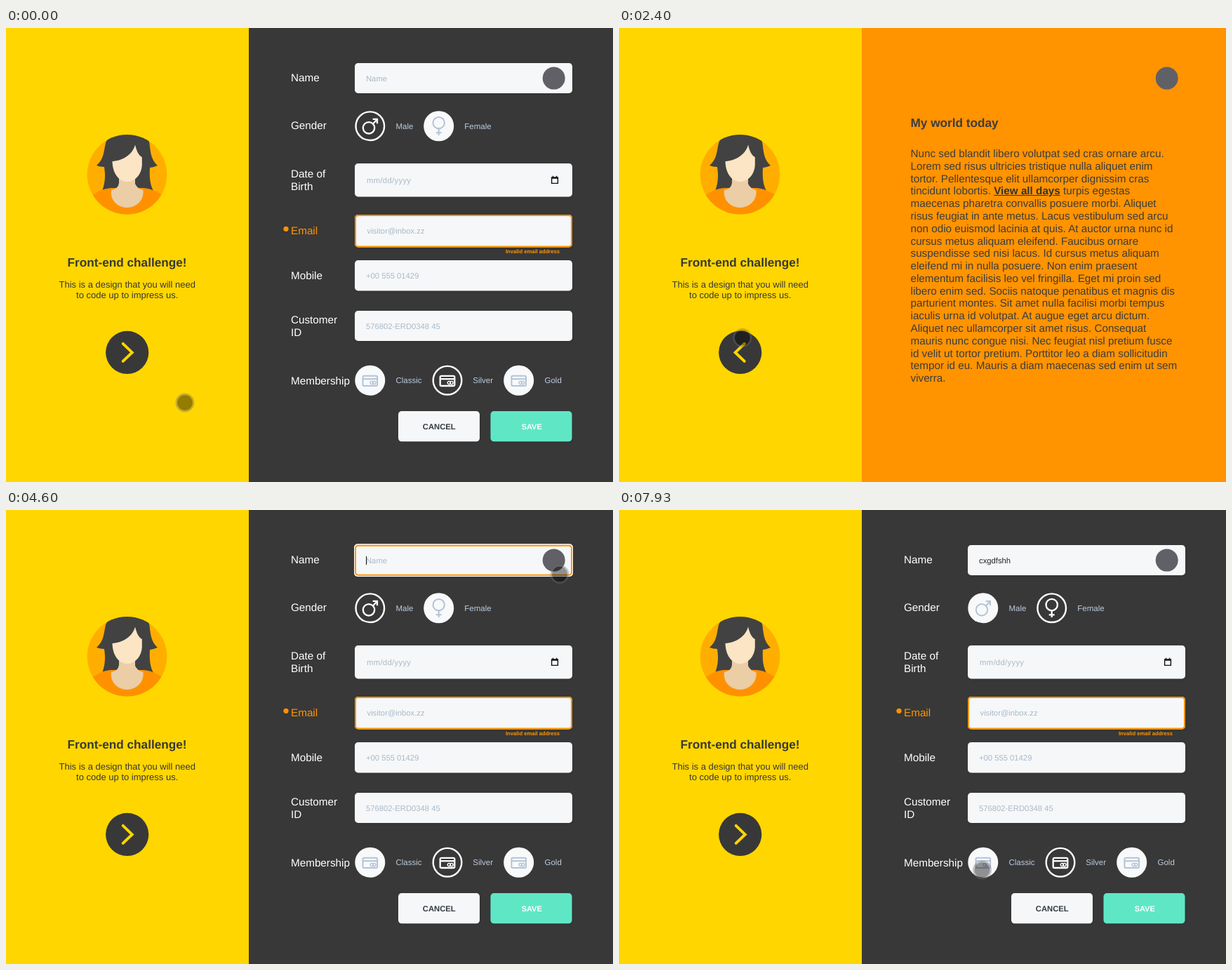
Recreate the animation shown at these times as an HTML page. Size 865 by 647 pixels, loop 8 s.

```html
<!DOCTYPE html>
<html lang="en">
<head>
<meta charset="utf-8">
<title>Front-end challenge</title>
<style>
  html, body { margin: 0; width: 100%; height: 100%; overflow: hidden; background: #383838; }
  body, text { font-family: "Liberation Sans", Arial, sans-serif; text-rendering: geometricPrecision; }
  svg, #panel { position: absolute; left: 0; top: 0; }
  svg { width: 865px; height: 647px; }
  #panel { left: 346px; height: 647px; overflow: hidden; background: #ff9300; }
  #copy { position: absolute; top: 0; height: 680px; display: flex; flex-direction: column; justify-content: center;
    color: #3d3d3d; font-size: 15.25px; line-height: 17.78px; }
  #copy div { position: relative; }
  #copy p { margin: 0; }
  #copy h2 { position: absolute; bottom: 100%; left: 0; margin: 0 0 26.5px; font-size: 17.2px; line-height: 20px; white-space: nowrap; }
  #copy b { text-decoration: underline; color: #333; }
  .label { font-size: 15.25px; fill: #fff; }
  .hint { font-size: 11.25px; fill: #a8bac9; }
  .option { font-size: 11.5px; fill: #bccbe0; }
  .field { fill: #f6f7f9; }
  .radio circle.disc { fill: #f8f9fa; stroke: #f8f9fa; stroke-width: 2.4; }
  .radio .icon { fill: none; stroke: #b3c4d6; stroke-width: 2; }
  .radio.on circle.disc { fill: #383838; stroke: #fff; }
  .radio.on .icon { stroke: #fff; stroke-width: 2.3; }
  .invalid { fill: #ff9300; }
</style>
</head>
<body>
<svg viewBox="0 0 865 647">
  <defs>
    <clipPath id="round"><circle cx="172.5" cy="208.8" r="56.8"/></clipPath>
    <filter id="lift" x="-10%" y="-30%" width="120%" height="170%">
      <feDropShadow dx="1" dy="2" stdDeviation="2" flood-opacity=".08"/>
    </filter>
    <g id="male"><circle cx="-1.8" cy="2.6" r="8.2"/><path d="M4.2 -3.2 L10 -9.4 M3.8 -9.8 H10.2 V-3.4"/></g>
    <g id="female"><circle cy="-4.6" r="8.2"/><path d="M0 3.6 V13.4 M-4 9.6 H4"/></g>
    <g id="card">
      <rect x="-10.3" y="-6.4" width="20.6" height="14.2" rx="1.8"/>
      <path d="M-10 -2 H10"/>
      <g stroke-width="1.4"><circle cx="2.3" cy="3.4" r="2.1"/><circle cx="6" cy="3.4" r="2.1"/></g>
    </g>
  </defs>

  <rect width="346" height="647" fill="#ffd600"/>
  <g clip-path="url(#round)">
    <rect x="110" y="150" width="125" height="120" fill="#ffae00"/>
    <path fill="#424242" d="M142 164 Q145 152 173 151 Q200 152 204 162 C206 172 205 186 216 196 Q209 199 205 199 C204 215 206 224 210 232 L190 238 H154 L137 232 C141 222 142 212 140 198 Q134 198 129 196 C140 186 139 176 142 164Z"/>
    <path fill="#ff9100" d="M110 270 V246 C124 240 130 230 149 228 H196 C214 230 222 238 235 246 V270Z"/>
    <path fill="#ebcda6" d="M161 208 H184 V222 Q187 229 195.5 231 C197 247 184 256 172.5 256 C161 256 148 247 150 231 Q160 229 161 221Z"/>
    <path fill="#fce5c5" d="M151.5 190 C166 189 180 181 184 166.5 C186 174 188 181 193.8 184 V195 C193 211 182 219 172.5 219 C163 219 152 210 151.5 190Z"/>
  </g>
  <g text-anchor="middle" fill="#383838">
    <text x="172.6" y="339.7" font-size="17.2" font-weight="700">Front-end challenge!</text>
    <g font-size="13">
      <text x="172.7" y="369.6">This is a design that you will need</text>
      <text x="172.7" y="384.7">to code up to impress us.</text>
    </g>
  </g>
  <circle cx="172.7" cy="462.4" r="30.6" fill="#383838"/>
  <path id="arrow" d="M-6 -12.5 L7 0 L-6 12.5" fill="none" stroke="#ffd600" stroke-width="4" stroke-linecap="round"/>

  <g id="form">
    <g class="label">
      <text x="406" y="76.4">Name</text>
      <text x="406" y="144.4">Gender</text>
      <text x="406" y="213">Date of</text>
      <text x="406" y="230.7">Birth</text>
      <text x="406" y="294" class="invalid">Email</text>
      <text x="406" y="357.7">Mobile</text>
      <text x="406" y="421">Customer</text>
      <text x="406" y="438.8">ID</text>
      <text x="406" y="507.6">Membership</text>
    </g>
    <circle class="invalid" cx="399" cy="286.3" r="3.6"/>
    <g class="field" filter="url(#lift)">
      <rect x="497" y="50" width="310" height="43" rx="4.8"/>
      <rect x="497" y="193" width="310" height="47.5" rx="4.8"/>
      <rect x="497" y="266" width="310" height="46.5" rx="4.8"/>
      <rect x="497" y="331" width="310" height="43.5" rx="4.8"/>
      <rect x="497" y="403" width="310" height="43" rx="4.8"/>
      <rect x="559" y="546" width="116" height="43.3" rx="4.8"/>
      <rect x="690.5" y="546" width="116" height="43.3" rx="4.8" fill="#5ee7c5"/>
    </g>
    <rect x="498" y="267" width="308" height="44.5" rx="4" fill="none" stroke="#ff9300" stroke-width="2"/>
    <g id="focus" fill="none">
      <rect x="497" y="49.3" width="310" height="44.7" rx="4" stroke="#fff" stroke-width="2"/>
      <rect x="498" y="50.7" width="308" height="42" rx="4" stroke="#ff9300" stroke-width="1.9"/>
    </g>
    <text id="typed" x="513" y="75.7" font-size="11.25" fill="#222"></text>
    <rect id="caret" y="66" width="1" height="12" fill="#111"/>
    <g class="hint">
      <text id="empty" x="513" y="75.7">Name</text>
      <text x="514" y="220.5" letter-spacing=".33">mm/dd/yyyy</text>
      <text x="514.5" y="293.3">visitor@inbox.zz</text>
      <text x="513" y="356.6">+00 555 01429</text>
      <text x="513" y="428.6">576802-ERD0348 45</text>
    </g>
    <path d="M777.6 213 H786.4 V221.4 H777.6Z M777.6 214 H786.4 M779.5 210.8 V213 M784.5 210.8 V213" fill="none" stroke="#111" stroke-width="1.4"/>
    <text class="invalid" x="712" y="321" font-size="7.62" font-weight="700">Invalid email address</text>
    <g font-weight="700" text-anchor="middle">
      <text x="617.3" y="571.7" font-size="11.25" fill="#333b45">CANCEL</text>
      <text x="749.2" y="571.7" font-size="11" fill="#fff">SAVE</text>
    </g>
    <g id="radios"></g>
  </g>
</svg>

<div id="panel"><div id="copy"><div>
  <h2>My world today</h2>
  <p>Nunc sed blandit libero volutpat sed cras ornare arcu. Lorem sed risus ultricies tristique nulla aliquet enim tortor. Pellentesque elit ullamcorper dignissim cras tincidunt lobortis. <b>View all days</b> turpis egestas maecenas pharetra convallis posuere morbi. Aliquet risus feugiat in ante metus. Lacus vestibulum sed arcu non odio euismod lacinia at quis. At auctor urna nunc id cursus metus aliquam eleifend. Faucibus ornare suspendisse sed nisi lacus. Id cursus metus aliquam eleifend mi in nulla posuere. Non enim praesent elementum facilisis leo vel fringilla. Eget mi proin sed libero enim sed. Sociis natoque penatibus et magnis dis parturient montes. Sit amet nulla facilisi morbi tempus iaculis urna id volutpat. At augue eget arcu dictum. Aliquet nec ullamcorper sit amet risus. Consequat mauris nunc congue nisi. Nec feugiat nisl pretium fusce id velit ut tortor pretium. Porttitor leo a diam sollicitudin tempor id eu. Mauris a diam maecenas sed enim ut sem viverra.</p>
</div></div></div>

<svg viewBox="0 0 865 647">
  <circle cx="780.7" cy="71.6" r="16" fill="#606066"/>
  <g id="cursor">
    <circle id="dot" r="11"/>
    <circle r="12.2" fill="none" stroke="rgba(110,110,110,.38)" stroke-width="2.5"/>
  </g>
</svg>

<script>
const LOOP = 8000, OPEN = 1115, CLOSE = 2910, FOCUS = 4330, BLUR = 7100;
const $ = id => document.getElementById(id);

const radios = [
  ['male', 'Male', 518.8, 139.7, 555.5], ['female', 'Female', 616.7, 139.7, 653.3],
  ['card', 'Classic', 518.8, 502.2, 555.5], ['card', 'Silver', 629, 502.2, 665.3], ['card', 'Gold', 730.7, 502.2, 767.5]
];
$('radios').innerHTML = radios.map(([icon, name, x, y, tx]) =>
  `<g class="radio" id="${name}"><g transform="translate(${x} ${y})"><circle class="disc" r="20.3"/>
   <use class="icon" href="#${icon}"/></g><text class="option" x="${tx}" y="${y + 4}">${name}</text></g>`).join('');
$('Silver').classList.add('on');

// time, x, y
const path = [
  [0, 255, 534], [70, 254, 533], [250, 222, 508], [450, 175, 480], [670, 183, 473.5], [1080, 183, 473.5],
  [1130, 196, 478], [1270, 268, 505], [1600, 467, 562], [1760, 490, 583], [1930, 494, 589], [2000, 485, 580],
  [2200, 300, 490], [2350, 172, 431], [2470, 181, 455.5], [2930, 182, 455.5], [3000, 183, 456], [3400, 198, 466],
  [3530, 330, 330], [3730, 575, 100], [3800, 600, 85], [4000, 752, 57], [4130, 700, 70], [4330, 700, 70],
  [4450, 735, 159], [4600, 789, 91.5], [5470, 789, 91.5], [5700, 725, 92], [6000, 572, 112], [6150, 512, 138],
  [6270, 516, 152], [6500, 565, 167], [6750, 642, 160], [6930, 620, 146], [7100, 620, 146], [7450, 595, 300],
  [7700, 535, 470], [7930, 517.5, 513], [8000, 517.5, 513]
];
const keys = [[4800, 's'], [4870, 'sd'], [4930, 'sdfsd'], [5070, 'c'], [5130, 'cx'], [5270, 'cxg'],
  [5470, 'cxgd'], [5600, 'cxgdf'], [5730, 'cxgdfs'], [5830, 'cxgdfsh'], [5930, 'cxgdfshh']];

const clamp = v => Math.min(1, Math.max(0, v));
const between = (t, a, b) => t >= a && t < b;

function bezier(x1, y1, x2, y2) {
  const curve = (a, b, u) => 3 * a * u * (1 - u) ** 2 + 3 * b * u * u * (1 - u) + u ** 3;
  return x => {
    if (x <= 0 || x >= 1) return clamp(x);
    let lo = 0, hi = 1;
    for (let i = 0; i < 24; i++) {
      const mid = (lo + hi) / 2;
      if (curve(x1, x2, mid) < x) lo = mid; else hi = mid;
    }
    return curve(y1, y2, lo);
  };
}
const ease = bezier(.25, .1, .25, 1), easeInOut = bezier(.42, 0, .58, 1);

// 0 = closed, 1 = open
const toggle = (t, ease, ms) => t < CLOSE ? ease((t - OPEN) / ms) : 1 - ease((t - CLOSE) / ms);

function position(t) {
  const i = Math.max(1, path.findIndex(p => p[0] > t));
  const [a, b] = [path[i - 1], path[i]];
  const k = (t - a[0]) / (b[0] - a[0]);
  return [a[1] + (b[1] - a[1]) * k, a[2] + (b[2] - a[2]) * k];
}

function draw(t) {
  const inset = toggle(t, easeInOut, 372);
  $('panel').style.width = 519 * toggle(t, ease, 500) + 'px';
  $('copy').style.left = 69.5 * inset + 'px';
  $('copy').style.width = 382 * inset + 'px';
  $('copy').style.opacity = t < CLOSE ? clamp((t - OPEN - 115) / 300) : clamp(1 - (t - CLOSE) / 60);
  $('arrow').setAttribute('transform', `translate(172.7 462.4) rotate(${-180 * toggle(t, easeInOut, 275)})`);

  const [last, word] = keys.filter(k => k[0] <= t).pop() || [FOCUS, ''];
  const focused = between(t, FOCUS, BLUR);
  $('typed').textContent = word;
  $('empty').style.opacity = word ? 0 : 1;
  $('focus').style.opacity = focused ? 1 : 0;
  $('caret').style.opacity = focused && (t - last) % 1000 < 500 ? 1 : 0;
  $('caret').setAttribute('x', 513 + (word ? $('typed').getComputedTextLength() : 0));
  $('Male').classList.toggle('on', t < BLUR);
  $('Female').classList.toggle('on', t >= BLUR);

  const [x, y] = position(t);
  $('cursor').setAttribute('transform', `translate(${x} ${y})`);
  const pressed = between(t, 900, OPEN) || between(t, 2700, CLOSE);
  $('dot').setAttribute('fill', `rgba(0,0,0,${pressed ? .6 : .42})`);
}

const start = performance.now();
function tick() {
  draw((performance.now() - start) % LOOP);
  requestAnimationFrame(tick);
}
tick();
</script>
</body>
</html>
```
